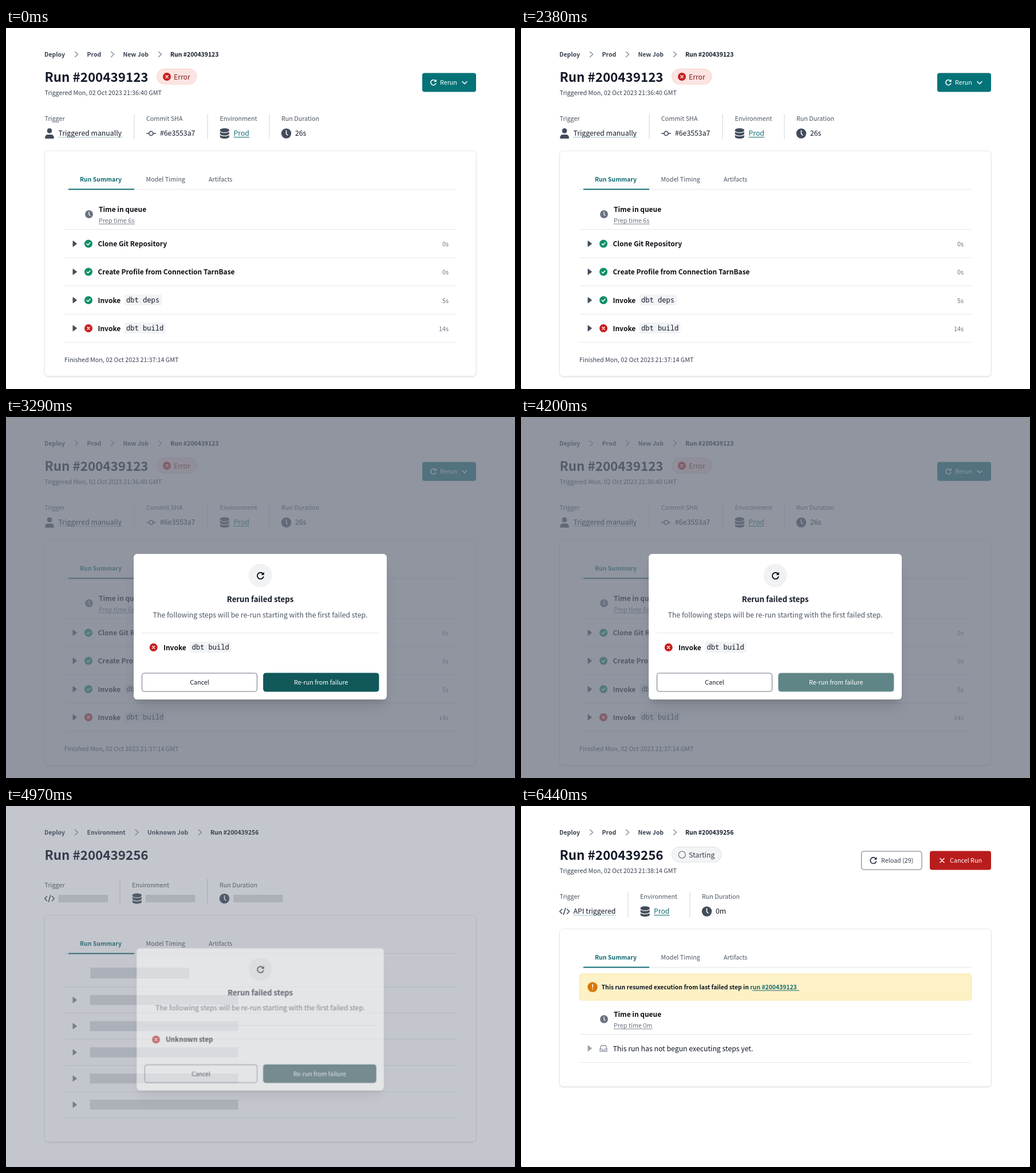
These frames come from a looping animation (889x630 px, 6510 ms). An HTML page:

```html
<!DOCTYPE html>
<html lang="en">
<head>
<meta charset="utf-8">
<title>Rerun from failure</title>
<style>
@property --p { syntax: "<number>"; inherits: true; initial-value: 0; }

html, body { margin: 0; width: 100%; height: 100%; overflow: hidden; background: #777; }
svg { display: block; width: 889px; height: 630px; border-radius: 2px; background: #fff; }

/* type */
text { font-family: "Noto Sans CJK JP", "Noto Sans CJK SC", "Noto Sans CJK", "Noto Sans", sans-serif; fill: #111827; white-space: pre; }
.s { font-size: 10.75px; }
.m { font-size: 12.28px; }
.sb { font-size: 10.45px; font-weight: 700; }
.mb { font-size: 11.96px; font-weight: 700; fill: #0b0d12; }
.h1 { font-size: 22.4px; font-weight: 700; }
.h2 { font-size: 13.25px; font-weight: 700; }
.code { font-family: "Noto Sans Mono", "DejaVu Sans Mono", monospace; font-size: 12.1px; }
.med { font-weight: 500; }
.mid { text-anchor: middle; }
.end { text-anchor: end; }
.dim { fill: #4b5563; }
.soft { fill: #6b7280; }
.slate { fill: #374151; }
.teal { fill: #0f6b70; }
.white { fill: #fff; }

/* shapes */
.line { fill: none; stroke: #e3e6ea; }
.rule { stroke: #cbd5dc; }
.bone { fill: #d8dade; }
.chip { fill: #f1f3f5; }
.card { fill: #fff; stroke: #e8eaed; filter: drop-shadow(0 1px 1.3px rgba(0, 0, 0, .13)); }
.stroke { fill: none; stroke: currentColor; stroke-width: 1.6; stroke-linecap: round; stroke-linejoin: round; }
.icon { color: #424c5b; }
.shade { opacity: .1; }

/* timeline: every value holds until the next one */
.anim, .overlay, .pop, .menu, .btn, .row1, .row2, .head, .foot, .cta, .label {
  animation: 6510ms step-end infinite;
}
.run1 { animation-name: run1; }
.bones { animation-name: bones; }
.run2 { animation-name: run2; }
.c30 { animation-name: c30; }
.c29 { animation-name: c29; }
.loading { animation-name: loading; }
.ready { animation-name: ready; }
.invoke { animation-name: invoke; }
.unknown { animation-name: unknown; }
@keyframes run1 { 0% { visibility: visible } 74.19% { visibility: hidden } }
@keyframes bones { 0% { visibility: hidden } 74.19% { visibility: visible } 79.56% { visibility: hidden } }
@keyframes run2 { 0% { visibility: hidden } 79.56% { visibility: visible } }
@keyframes c30 { 0% { visibility: hidden } 79.56% { visibility: visible } 93.54% { visibility: hidden } }
@keyframes c29 { 0% { visibility: hidden } 93.54% { visibility: visible } }
@keyframes loading { 0% { visibility: visible } 41.93% { visibility: hidden } }
@keyframes ready { 0% { visibility: hidden } 41.93% { visibility: visible } }
@keyframes invoke { 0% { visibility: hidden } 41.93% { visibility: visible } 74.19% { visibility: hidden } }
@keyframes unknown { 0% { visibility: hidden } 74.19% { visibility: visible } }

.btn { fill: #047377; animation-name: btn; }
@keyframes btn {
  0% { fill: #047377 } 12.9% { fill: #0b6062 } 13.97% { fill: #105355 } 15.05% { fill: #124e50 }
  35.48% { fill: #0b6062 } 36.55% { fill: #047377 }
}

.menu {
  opacity: var(--p); animation-name: menu;
  transform-origin: 821px 86px; transform: scale(calc(.95 + .05 * var(--p)));
}
@keyframes menu {
  0% { --p: 0 } 16.12% { --p: .35 } 17.2% { --p: .8 } 18.27% { --p: .96 } 19.35% { --p: 1 }
  34.4% { --p: .5 } 35.48% { --p: 0 }
}
.row1 { animation-name: row1; }
.row2 { animation-name: row2; }
@keyframes row1 { 0% { fill: #d8f7f6 } 24.73% { fill: #fff } }
@keyframes row2 { 0% { fill: #fff } 24.73% { fill: #d8f7f6 } }

.overlay, .pop { opacity: var(--p); animation-name: pop; }
.pop {
  transform-origin: 444px 366px;
  transform: translateY(calc(13.7px * (1 - var(--p)))) scale(calc(.95 + .05 * var(--p)));
}
@keyframes pop {
  0% { --p: 0 } 37.63% { --p: .5 } 38.7% { --p: .78 } 39.78% { --p: .935 } 40.86% { --p: 1 }
  75.26% { --p: .88 } 76.34% { --p: .54 } 77.41% { --p: .04 } 78.49% { --p: 0 }
}
.head { animation-name: head; }
.foot { animation-name: foot; }
@keyframes head { 0% { transform: translateY(-21px) } 41.93% { transform: none } }
@keyframes foot { 0% { transform: translateY(21px) } 41.93% { transform: none } }

.cta { animation-name: cta; }
.label { animation-name: label; }
@keyframes cta {
  0% { fill: #fff; stroke: #d1d5db }
  41.93% { fill: #047377; stroke: #047377 }
  50.53% { fill: #11585a; stroke: #11585a }
  51.61% { fill: #125254; stroke: #125254 }
  52.68% { fill: #124e50; stroke: #124e50 }
  64.51% { fill: #5f8586; stroke: #7d9c9d }
  65.59% { fill: #b5c7c8; stroke: #c0cccd }
  66.66% { fill: #f0f4f4; stroke: #d1d5db }
  67.74% { fill: #fff; stroke: #d1d5db }
  75.26% { fill: #8fa9aa; stroke: #8fa9aa }
  76.34% { fill: #33595b; stroke: #33595b }
  77.41% { fill: #124e50; stroke: #124e50 }
}
@keyframes label { 0% { fill: #6b7280 } 41.93% { fill: #fff } 65.59% { fill: #6b7280 } 75.26% { fill: #fff } }

.spin { animation: spin 840ms steps(12) infinite; transform-box: fill-box; transform-origin: center; }
@keyframes spin { to { transform: rotate(360deg) } }
</style>
</head>
<body>
<svg id="stage" viewBox="0 0 889 630">
  <defs>
    <path id="chev" class="stroke" d="M-2.5-4.5 2.5 0-2.5 4.5" style="stroke-width:1.2"/>
    <path id="down" class="stroke" d="M-4-2 0 2 4-2"/>
    <path id="tri" d="M-3-5 3.5 0-3 5Z" fill="currentColor" stroke="currentColor" stroke-linejoin="round"/>
    <g id="ok"><circle r="7" fill="#0d8f68"/><path d="M-2.8.2-.8 2.2 2.8-1.8" class="stroke" color="#fff"/></g>
    <g id="bad"><circle r="7" fill="#c81e1e"/><path d="M-2-2 2 2M2-2-2 2" class="stroke" color="#fff"/></g>
    <g id="clock"><circle r="8.7" fill="currentColor"/><path d="M0-5V.6L2.4 3" class="stroke" color="#fff"/></g>
    <g id="user" fill="currentColor"><circle cy="-4.6" r="4.3"/><path d="M-7.8 9V7a5 5 0 0 1 5-5H2.8a5 5 0 0 1 5 5V9Z"/></g>
    <g id="commit" class="stroke"><circle r="3.6"/><path d="M-8-0H-3.6M3.6 0H8"/></g>
    <g id="db"><path d="M-8-6c0-4 16-4 16 0V6c0 4-16 4-16 0Z" fill="currentColor"/><path d="M-8-4c2 3.6 14 3.6 16 0M-8 1.6c2 3.6 14 3.6 16 0" fill="none" stroke="#fff" stroke-width="1.3"/></g>
    <path id="tags" class="stroke" d="M-4.5-4-8.3 0-4.5 4M4.5-4 8.3 0 4.5 4M1.6-5.5-1.6 5.5"/>
    <g id="redo"><path class="stroke" d="M3.4-3A4.6 4.6 0 1 0 4.3 1.6"/><path d="M5.2-5.4V-1H.8Z" fill="currentColor"/></g>
    <g id="play"><circle r="7" fill="currentColor"/><path d="M-2-3.3 3.5 0-2 3.3Z" fill="#fff"/></g>
    <g id="retry" class="stroke" style="stroke-width:1.3"><path d="M-5.6-1A5.6 5.6 0 0 1 4.8-3M5.6 1A5.6 5.6 0 0 1-4.8 3M5.4-5.6V-2.6H2.4M-5.4 5.6V2.6H-2.4M0-2.6V.4M0 2.5v.1"/></g>
    <path id="cross" class="stroke" d="M-3.5-3.5 3.5 3.5M3.5-3.5-3.5 3.5"/>
    <path id="tray" class="stroke" d="M-6 1-4-5H4L6 1V5H-6ZM-6 1H-3L-2 2.8H2L3 1H6" style="stroke-width:1.3"/>
  </defs>
</svg>
<script>
const text = (x, y, str, cls) => `<text x="${x}" y="${y}" class="${cls}">${str}</text>`;
const rect = (x, y, w, h, attrs = '', r = 0) =>
  `<rect x="${x}" y="${y}" width="${w}" height="${h}" rx="${r}" ${attrs}/>`;
const icon = (id, x, y, color = '#424c5b', k = 1) =>
  `<use href="#${id}" transform="translate(${x} ${y}) scale(${k})" color="${color}"/>`;
const hline = (y, x1 = 102, x2 = 786, attrs = 'class="line"') => `<path d="M${x1} ${y}H${x2}" ${attrs}/>`;
const vline = (x, y) => `<path d="M${x} ${y}v44" class="line rule"/>`;
const group = (cls, ...parts) => `<g class="${cls}">${parts.join('')}</g>`;
const bone = (x, y, w, h) => rect(x, y, w, h, 'class="bone"');

const TEAL = 'stroke="#0f6b70"';
const GREY = '#6b7280';

// Blurred rectangle under a floating panel
const shadow = (x, y, w, h, dy, inset, blur) =>
  rect(x + inset, y + dy + inset, w - 2 * inset, h - 2 * inset, `class="shade" style="filter:blur(${blur}px)"`, 5);

const crumbs = (items, chevrons) =>
  items.map(([x, str], i) => text(x, 50, str, i == 3 ? 'sb' : 'sb slate')).join('') +
  chevrons.map(x => icon('chev', x, 46, '#7b8491')).join('');

const labels = (y, items) => items.map(([x, str]) => text(x, y, str, 's dim')).join('');

const card = (y, h) => rect(67.5, y, 753.5, h, 'class="card"', 6);

const tabs = y => [
  text(129, y, 'Run Summary', 'sb teal'),
  text(244.5, y, 'Model Timing', 's dim'),
  text(354, y, 'Artifacts', 's dim'),
  hline(y + 14),
  hline(y + 14, 109, 224, `${TEAL} stroke-width="2"`),
].join('');

const queue = (y, prep, end) => [
  icon('clock', 145, y, GREY, .8),
  text(162, y - 4, 'Time in queue', 'mb'),
  text(162, y + 15, prep, 's soft'),
  hline(y + 17, 162, end, `stroke="${GREY}" stroke-width=".9"`),
].join('');

const command = (x, y, cmd, w) =>
  text(x, y, 'Invoke', 'mb') + rect(x + 46.5, y - 14.5, w, 19, 'class="chip"', 3) + text(x + 49.5, y - .5, cmd, 'code');

const step = (y, state, body, secs) => [
  icon('tri', 120, y), icon(state, 144, y), body,
  text(773, y + 4.5, secs, 's soft end'), hline(y + 24.5),
].join('');

const dotted = (x1, x2) => hline(190.5, x1, x2, `${TEAL} stroke-dasharray="1 1.5"`);
const prodLink = x => text(x, 188, 'Prod', 'm teal') + hline(190.5, x, x + 27.5, TEAL);

const run1 = group('anim run1',
  crumbs([[67, 'Deploy'], [141.5, 'Prod'], [204.5, 'New Job'], [287, 'Run #200439123']], [123, 186, 269]),
  text(67.5, 94, 'Run #200439123', 'h1'),
  rect(263.5, 71.5, 69.5, 26.5, 'fill="#fde4e2" stroke="#f8cfca"', 13.2),
  icon('bad', 281, 85), text(293, 89.5, 'Error', 'm" style="fill:#7f1d1d'),
  text(67.5, 117, 'Triggered Mon, 02 Oct 2023 21:36:40 GMT', 's slate'),
  labels(162, [[67.5, 'Trigger'], [245, 'Commit SHA'], [373.5, 'Environment'], [481, 'Run Duration']]),
  vline(224, 150), vline(352, 150), vline(460, 150),
  icon('user', 76, 184), text(91.5, 188, 'Triggered manually', 'm'), dotted(91.5, 203),
  icon('commit', 253.5, 184), text(269, 188, '#6e3553a7', 'm'),
  icon('db', 381.8, 184), prodLink(397.5),
  icon('clock', 489.5, 184), text(505, 188, '26s', 'm'),
  rect(727, 78.5, 94, 33, 'class="btn"', 4),
  icon('redo', 746.5, 95, '#fff'), text(758, 99, 'Rerun', 's med white'), icon('down', 801, 95.5, '#fff'),
  card(214.5, 393), tabs(267.5), queue(325, 'Prep time 6s', 225), hline(351.5),
  step(376.5, 'ok', text(160.5, 381, 'Clone Git Repository', 'mb'), '0s'),
  step(425.5, 'ok', text(160.5, 430, 'Create Profile from Connection TarnBase', 'mb'), '0s'),
  step(475, 'ok', command(160.5, 479.5, 'dbt deps', 65), '5s'),
  step(524, 'bad', command(160.5, 528.5, 'dbt build', 71.5), '14s'),
  text(102, 582.5, 'Finished Mon, 02 Oct 2023 21:37:14 GMT', 's slate'),
);

const bones = group('anim bones',
  crumbs([[67, 'Deploy'], [141.5, 'Environment'], [247, 'Unknown Job'], [357, 'Run #200439256']], [123, 228.5, 339]),
  text(67.5, 94, 'Run #200439256', 'h1'),
  labels(141.5, [[67.5, 'Trigger'], [220, 'Environment'], [373, 'Run Duration']]),
  vline(199, 127), vline(351.5, 127),
  icon('tags', 76, 161.5), icon('db', 228.8, 161.5), icon('clock', 381.5, 161.5),
  [91.5, 244, 397].map(x => bone(x, 155, 86.5, 13)).join(''),
  card(190.5, 395.5), tabs(243.5),
  bone(147.5, 282, 172.5, 19), hline(315.5),
  [0, 1, 2, 3, 4].map(i => {
    const y = 338.5 + 45.7 * i;
    return icon('tri', 120, y, '#7d8694') + bone(146.5, y - 8.7, 259, 17.4) + hline(y + 23);
  }).join(''),
);

const run2 = group('anim run2',
  crumbs([[67, 'Deploy'], [141.5, 'Prod'], [204.5, 'New Job'], [287, 'Run #200439256']], [123, 186, 269]),
  text(67.5, 94, 'Run #200439256', 'h1'),
  rect(263.5, 71.5, 86.5, 26.5, 'fill="#f3f4f5" stroke="#dfe2e5"', 13.2),
  `<circle cx="281.3" cy="85" r="6" fill="none" stroke="${GREY}" stroke-width="1.2"/>`,
  text(293, 89.5, 'Starting', 'm slate'),
  text(67.5, 117, 'Triggered Mon, 02 Oct 2023 21:38:14 GMT', 's slate'),
  rect(594.5, 79, 105.5, 32, `fill="#fff" stroke="${GREY}"`, 4),
  icon('redo', 615.5, 95, '#374151', 1.15),
  group('anim c30', text(629, 99, 'Reload (30)', 's slate')),
  group('anim c29', text(629, 99, 'Reload (29)', 's slate')),
  rect(714, 78.5, 107, 33, 'fill="#b91c1c"', 4),
  icon('cross', 735.5, 95, '#fff'), text(749, 99, 'Cancel Run', 's med white'),
  labels(162, [[67.5, 'Trigger'], [208, 'Environment'], [316, 'Run Duration']]),
  vline(187, 150), vline(295, 150),
  icon('tags', 76, 184), text(91.5, 188, 'API triggered', 'm'), dotted(91.5, 166),
  icon('db', 216.7, 184), prodLink(232),
  icon('clock', 324.5, 184), text(340, 188, '0m', 'm'),
  card(214.5, 275), tabs(267.5),
  rect(102.5, 293, 684, 46, 'fill="#fdf1c6" stroke="#f9e5a0"', 4),
  '<circle cx="125" cy="316" r="8.7" fill="#d97706"/><path d="M125 311.5v5.2M125 319.8v.2" class="stroke" color="#fff"/>',
  text(140.5, 320, 'This run resumed execution from last failed step in <tspan class="teal">run #200439123</tspan>', 'sb" style="font-size:10.4px'),
  hline(322, 404, 486, TEAL),
  queue(372, 'Prep time 0m', 229.5), hline(398.5),
  icon('tri', 120, 423, '#9ca3af'), icon('tray', 144, 423, '#8b93a0'),
  text(160.5, 427.5, 'This run has not begun executing steps yet.', 'm'),
  hline(447.5),
);

const menu = group('menu',
  shadow(667, 86, 154, 63, 8.6, 2.6, 6.4),
  rect(666.5, 85.5, 154, 64, 'fill="#fff" stroke="#eceef0"', 4),
  rect(667, 86, 153, 31.5, 'class="row1"', 3), rect(667, 117.5, 153.5, 31.5, 'class="row2"', 3),
  icon('play', 684, 102), text(697.5, 106, 'Rerun from start', 's'),
  icon('retry', 684, 133), text(697.5, 137, 'Rerun from failure', 's'),
);

const panel = (y, h) =>
  shadow(223, y, 442, h, 17, 4.3, 10.7) + shadow(223, y, 442, h, 7, 5, 4.3) + rect(223, y, 442, h, 'fill="#fff"', 6);
const pending = (y, w) =>
  `<g class="spin"><circle cx="257.7" cy="${y}" r="7.5" fill="none"/>` +
  `<path d="M261.4 ${y - 5.6}a6.7 6.7 0 0 1 0 11.2" class="stroke icon"/></g>` + bone(274, y - 8.5, w, 17);

const modal = group('pop',
  group('anim loading', panel(218, 297), pending(379, 288.5), hline(401.5, 237, 651), pending(424.5, 246)),
  group('anim ready', panel(239, 254), icon('bad', 257.7, 402)),
  group('anim invoke', command(275, 406.5, 'dbt build', 72)),
  group('anim unknown', text(275, 406.5, 'Unknown step', 'mb')),
  group('head',
    '<circle cx="444" cy="276.5" r="20.5" fill="#f1f2f4"/>',
    icon('redo', 444.5, 277, '#111', 1.2),
    text(444, 323, 'Rerun failed steps', 'h2 mid'),
    text(444, 350.3, 'The following steps will be re-run starting with the first failed step.', 'm mid dim'),
    hline(377, 237, 651)),
  group('foot',
    rect(237.5, 447, 201, 32, `fill="#fff" stroke="${GREY}"`, 4), text(338, 467, 'Cancel', 's mid'),
    rect(449.7, 447, 201.3, 32, 'class="cta"', 4), text(550.3, 467, 'Re-run from failure', 's med mid label')),
);

const overlay = rect(0, 0, 889, 630, 'fill="#6b7280" fill-opacity=".75"');

document.getElementById('stage').insertAdjacentHTML('beforeend',
  run1 + bones + run2 + menu + group('overlay', overlay) + modal);
</script>
</body>
</html>
```
